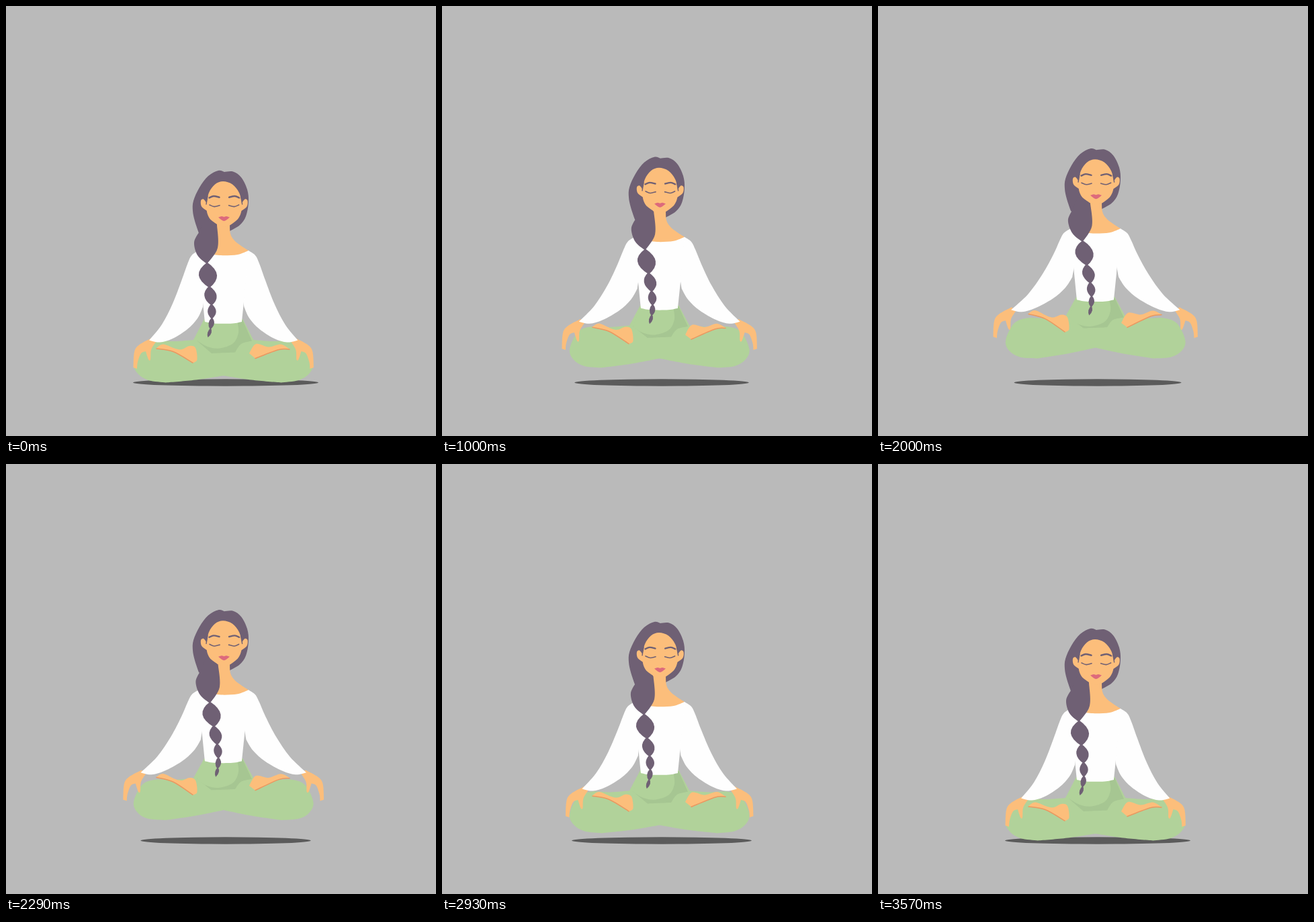
Animation, 640 px wide and 640 px high, one loop 3.64 s. Source, as an HTML page with a canvas:

```html
<!DOCTYPE html>
<html lang="en">
<head>
<meta charset="utf-8">
<title>Levitating meditation</title>
<style>
html, body { margin: 0; width: 100%; height: 100%; overflow: hidden; background: #bababa; }
canvas { display: block; width: 640px; height: 640px; }
</style>
</head>
<body>
<canvas id="stage" width="640" height="640"></canvas>
<script>
const ctx = document.getElementById('stage').getContext('2d');

const LOOP = 3640, STEP = 500 / 7, LAST = 50;
const RISE = 34.2, CENTER = 323.7, FACE_CENTER = 324.8;
const HAIR = '#6f6074', SKIN = '#fcbe7b', WHITE = '#fefefe', GREEN = '#b1d29a',
      SHADE = '#a6c692', SOLE = '#ea9861', LIPS = '#dd6a7c', GROUND = '#5b5b5b';

const clamp = x => Math.max(0, Math.min(1, x));
const smooth = x => x * x * (3 - 2 * x);

// Each rule gives the full offset of a resting point when the figure is highest.
const rigid = () => [0, -RISE];
const reach = (x, y) => [-15.6 * clamp((y - 364) / 133) ** 3, -RISE - 13 * smooth(clamp((y - 364) / 100))];
const follow = () => [-18.8, -RISE - 13.4];
const fold = (x, y) => [0, -RISE - 9.4 * (1 - Math.abs(x - CENTER) / 134) * clamp((y - 469) / 81)];
const tilt = x => [0, -RISE - 13 - 6.5 * (Math.abs(x - CENTER) - 40) / 60];
const swing = (x, y) => [2 + 12.5 * clamp((y - 340) / 156), -RISE];

function curve(points) {
  for (let i = 0; i < points.length - 1; i++) {
    const a = points[i - 1] || points[i], b = points[i], c = points[i + 1], d = points[i + 2] || c;
    ctx.bezierCurveTo(b[0] + (c[0] - a[0]) / 6, b[1] + (c[1] - a[1]) / 6,
                      c[0] - (d[0] - b[0]) / 6, c[1] - (d[1] - b[1]) / 6, c[0], c[1]);
  }
}

// Points are joined by a smooth curve; "/" marks a corner. A width makes it a line.
function shape(color, text, move = rigid, width = 0) {
  const pieces = text.split('/').map(piece =>
    piece.trim().split(/\s+/).map(pair => pair.split(',').map(Number)));
  return lift => {
    let end;
    ctx.beginPath();
    for (const piece of pieces) {
      const points = piece.map(([x, y]) => {
        const [dx, dy] = move(x, y);
        return [x + dx * lift, y + dy * lift];
      });
      if (end) points.unshift(end);
      else ctx.moveTo(...points[0]);
      curve(points);
      end = points.at(-1);
    }
    ctx.fillStyle = ctx.strokeStyle = color;
    ctx.lineWidth = width;
    ctx.lineCap = 'round';
    width ? ctx.stroke() : ctx.fill();
  };
}

const pair = (center, ...parts) => lift => {
  parts.forEach(part => part(lift));
  ctx.save();
  ctx.translate(2 * center, 0);
  ctx.scale(-1, 1);
  parts.forEach(part => part(lift));
  ctx.restore();
};

function ground(lift) {
  ctx.fillStyle = GROUND;
  ctx.beginPath();
  ctx.ellipse(327, 560.5, 138 - 14 * lift, 5.2, 0, 0, 2 * Math.PI);
  ctx.fill();
}

// Pointed beads, each smaller than the one above by fixed ratios.
function braid(lift) {
  const top = 383, span = 113, overlap = 1.5;
  const at = y => {
    const u = clamp((y - top) / span);
    const [dx, dy] = swing(0, y);
    return [299.5 + 47 * u * u * (1 - u) + dx * lift, y + dy * lift];
  };
  ctx.fillStyle = HAIR;
  for (let i = 0, y = top, size = 35, half = 13.5; i < 5; i++) {
    const [x0, y0] = at(y - overlap), [x1, y1] = at(y + size / 2), [x2, y2] = at(y + size + overlap);
    ctx.beginPath();
    ctx.moveTo(x0, y0);
    for (const side of [-1, 1]) {
      const x = 2 * x1 - (x0 + x2) / 2 + side * 2 * half;
      ctx.quadraticCurveTo(x, y1, ...(side < 0 ? [x2, y2] : [x0, y0]));
    }
    ctx.fill();
    y += size;
    size *= 0.76;
    half *= 0.68;
  }
}

const figure = [
  ground,
  // hair, neck and face
  shape(HAIR, '325,247 316,245 301,253 288,270 279,290 278,305 281,320 287,338 / 300,345 / 333,335 / 348,326 357,313 361,292 359,273 350,255 338,246.5 325,247'),
  shape(SKIN, '314,318 / 314,364 / 307,375 / 345,374 361,364 / 350,357 340,349 334,339 333,322'),
  shape(SKIN, '298,296 302,278 311,265.5 323,261 337,265.5 347,278 352,296 / 349,310 342,320 325,329 307,320 300,310 298,296'),
  pair(FACE_CENTER,
    shape(SKIN, '299,294 294,287.5 290,290 291.5,299 301,306'),
    shape(HAIR, '300,283 298,295', rigid, 1.4),
    shape(HAIR, '302.5,285.5 309,283 317.5,284.7', rigid, 2.4),
    shape(HAIR, '303,296 310,298.6 318,296.8', rigid, 1.6)),
  shape(LIPS, '316,314.5 / 321,313 324.5,314 / 328,313 333,314.5 / 324.5,320 316,314.5'),
  // legs
  pair(CENTER, shape(GREEN, '325,465 / 295,466 / 279,497 / 250,499 222,498 202,506 190,531 196,547 212,557 238,560.5 / 282,556.5 325,550', fold)),
  shape(SHADE, '352,467 / 344,469 / 284,498 / 306,517 / 341,515.5 / 350,503 366,498.5', fold),
  shape(GREEN, '296,466 / 344,468 / 346,486 338,502 318,509.5 300,507 284,498'),
  shape(SKIN, '224,509 234,503.5 252,510 262,511 273,506 282,509 284.5,526 279,531 / 249,514.5 224,510', tilt),
  shape(SOLE, '224,510 249,514.5 278,531', tilt, 1.5),
  shape(SKIN, '422,510.5 409,503.5 391,507.5 372,503 362,517 / 371,524.5 / 406,511.5 422,511', tilt),
  shape(SOLE, '371,524.5 406,511.5 422,511', tilt, 1.5),
  // upper body
  pair(CENTER,
    shape(SKIN, '217,494 / 198,504.5 191,515 189.5,538 / 195,540 / 196,530 201,517 208,514 / 212,526 215,526 216,512 223,500', follow),
    shape(WHITE, '286.4,364 276.5,371 270.5,383 261.5,408 248,443 232,474 213,497.5 / 229,500.5 248,495 270,481 285,465 293,448 / 300,380', reach)),
  shape(WHITE, '286,368 / 307,370 / 325,371.3 345,370 361,364 / 355,431 / 351,470 / 337,472.5 310,472.5 296,470 / 292,431'),
  shape(HAIR, '287,337 280,352 285,371 299,384 / 315,360 314,326 / 296,316', swing),
  braid
];

// Smooth rise and fall, stepped at 14 poses a second.
function liftAt(ms) {
  const step = Math.min(LAST, Math.floor((ms + 5) / STEP));
  return smooth(1 - Math.abs(2 * step / LAST - 1));
}

let start;
function tick(now) {
  start ??= now;
  const lift = liftAt((now - start) % LOOP);
  ctx.fillStyle = '#bababa';
  ctx.fillRect(0, 0, 640, 640);
  figure.forEach(part => part(lift));
  requestAnimationFrame(tick);
}
requestAnimationFrame(tick);
</script>
</body>
</html>
```
